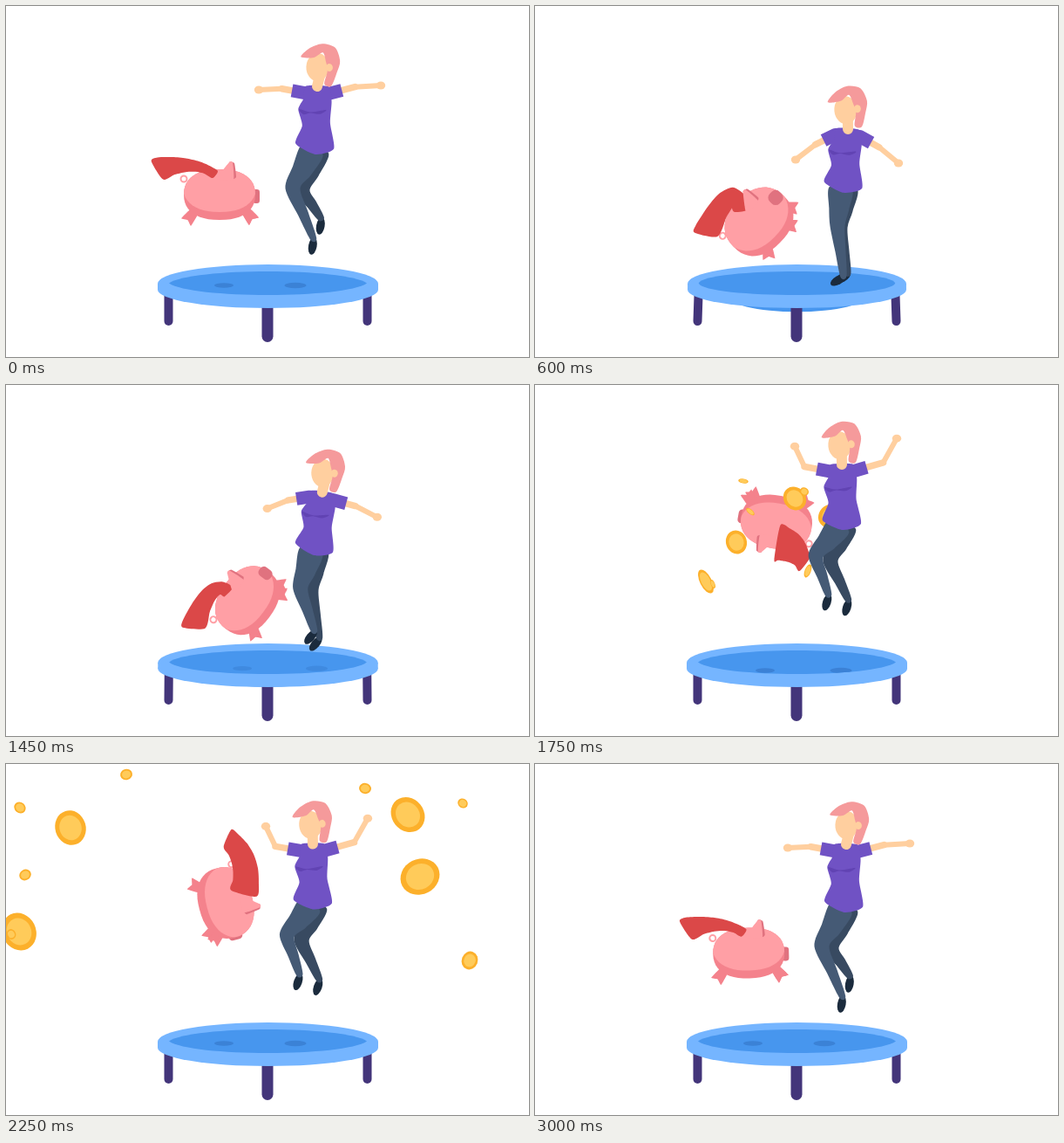
These frames come from a looping animation (600 by 402 pixels, 3.05 s). An HTML page with a canvas:

```html
<!DOCTYPE html>
<html lang="en">
<head>
<meta charset="utf-8">
<title>Trampoline</title>
<style>
html, body { margin: 0; width: 100%; height: 100%; overflow: hidden; background: #fff; }
canvas { display: block; width: 600px; height: 402px; }
</style>
</head>
<body>
<canvas id="stage" width="600" height="402"></canvas>
<script>
const LOOP = 3050, STEP = 50, RAD = Math.PI / 180;
const ctx = document.getElementById('stage').getContext('2d');

const C = {
  rim: '#75b5ff', mat: '#4796ee', shade: '#3b82d6', post: '#43357a',
  pig: '#ff9fa5', belly: '#f4828c', snout: '#e0727f', cape: '#db4848',
  hair: '#f59a9b', skin: '#ffcf9f', shirt: '#7052c4', fold: '#6143b3',
  leg: '#455a75', legBack: '#384a61', shoe: '#1b2b3d',
  gold: '#fcb02b', goldIn: '#ffcb5a'
};

const clamp = (v, a = 0, b = 1) => Math.min(b, Math.max(a, v));
const mix = (a, b, p) => a + (b - a) * p;
const mixAll = (a, b, p) => a.map((v, i) => mix(v, b[i], p));
const ease = {
  io: p => p * p * (3 - 2 * p),
  in: p => p * p,
  out: p => 1 - (1 - p) * (1 - p),
  lin: p => p
};

// keys: [time, easing towards the next key, ...values]
function at(keys, t) {
  let i = 0;
  while (i < keys.length - 2 && t >= keys[i + 1][0]) i++;
  const [t0, e, ...a] = keys[i], [t1, , ...b] = keys[i + 1];
  return mixAll(a, b, ease[e](clamp((t - t0) / (t1 - t0))));
}

function fill(color) { ctx.fillStyle = color; ctx.fill(); }

function oval(x, y, rx, ry, rot, color) {
  ctx.beginPath();
  ctx.ellipse(x, y, rx, ry, rot, 0, 7);
  fill(color);
}

// closed smooth outline through flat x,y pairs
function blob(v, color, k = 1 / 6) {
  const n = v.length / 2;
  const px = i => v[((i + n) % n) * 2], py = i => v[((i + n) % n) * 2 + 1];
  ctx.beginPath();
  ctx.moveTo(px(0), py(0));
  for (let i = 0; i < n; i++) {
    ctx.bezierCurveTo(
      px(i) + (px(i + 1) - px(i - 1)) * k, py(i) + (py(i + 1) - py(i - 1)) * k,
      px(i + 1) - (px(i + 2) - px(i)) * k, py(i + 1) - (py(i + 2) - py(i)) * k,
      px(i + 1), py(i + 1));
  }
  fill(color);
}

function line(points, width, color, cap = 'round') {
  ctx.beginPath();
  for (const [x, y] of points) ctx.lineTo(x, y);
  ctx.lineWidth = width;
  ctx.lineCap = cap;
  ctx.lineJoin = 'round';
  ctx.strokeStyle = color;
  ctx.stroke();
}

// points beside p, at right angles to the direction (dx, dy)
function sides([x, y], [dx, dy], w) {
  const d = Math.hypot(dx, dy) || 1, nx = -dy / d * w, ny = dx / d * w;
  return [[x + nx, y + ny], [x - nx, y - ny]];
}
const ribbon = (rows, tip = []) =>
  [...rows.map(r => r[0]), ...tip, ...rows.map(r => r[1]).reverse()].flat();

// ---- woman
const arch = {
  neck: [357, 92], hem: [355, 168], tilt: [5], toe: [100],
  handL: [290, 96], handR: [430, 91],
  kneeF: [329, 209], footF: [353, 267], kneeB: [340, 211], footB: [362, 244]
};
const stand = {
  neck: [359, 141], hem: [354, 212], tilt: [-3], toe: [150],
  handL: [299, 176], handR: [417, 180],
  kneeF: [347, 252], footF: [354, 310], kneeB: [350, 254], footB: [359, 307]
};
const kick = {
  neck: [369, 93], hem: [353, 163], tilt: [18], toe: [98],
  handL: [301, 86], handR: [440, 105],
  kneeF: [323, 203], footF: [354, 238], kneeB: [350, 205], footB: [361, 263]
};
const tuck = {
  neck: [352, 91], hem: [353, 164], tilt: [-3], toe: [108],
  handL: [298, 70], handR: [415, 61],
  kneeF: [322, 196], footF: [337, 241], kneeB: [339, 202], footB: [360, 247]
};
const bent = {
  neck: [349, 144], hem: [353, 214], tilt: [-17], toe: [150],
  handL: [296, 186], handR: [411, 174],
  kneeF: [346, 254], footF: [353, 316], kneeB: [351, 256], footB: [360, 309]
};
const flights = [arch, kick, tuck, arch];
const landings = [[550, stand], [1560, stand], [2550, bent]];

// falls into the landing pose, then springs out into the next flight
function womanPose(t) {
  const i = t < 1050 ? 0 : t < 2050 ? 1 : 2;
  const [hit, land] = landings[i], d = t - hit;
  const air = flights[d < 0 ? i : i + 1];
  const w = d < 0 ? ease.in(clamp((330 + d) / 280)) : 1 - ease.out(clamp((d - 50) / 145));
  const dip = 6 * Math.max(0, 1 - Math.abs(d) / 50);
  const pose = {};
  for (const k in air) {
    pose[k] = mixAll(air[k], land[k], w);
    if (pose[k].length > 1) pose[k][1] += dip;
  }
  return pose;
}

function leg(hip, knee, foot, toe, color) {
  const a = toe * RAD, to = (p, q) => [q[0] - p[0], q[1] - p[1]];
  oval(foot[0] + Math.cos(a) * 7, foot[1] + Math.sin(a) * 8, 10, 4.8, a, C.shoe);
  blob(ribbon([
    sides(hip, to(hip, knee), 13),
    sides(mixAll(hip, knee, .55), to(hip, knee), 11.5),
    sides(knee, to(hip, foot), 8.5),
    sides(mixAll(knee, foot, .5), to(knee, foot), 6),
    sides(foot, to(knee, foot), 3.5)
  ]), color, 1 / 7);
}

function arm(body, hand, out) {
  const shoulder = body(14 * out, 8);
  const lift = clamp((shoulder[1] - hand[1] - 12) / 16);
  const mid = mixAll(shoulder, hand, .5);
  const elbow = [mid[0] + out * 9 * lift, mid[1] + 12 * lift - 3];
  const cuff = mixAll(shoulder, elbow, 15 / Math.hypot(elbow[0] - shoulder[0], elbow[1] - shoulder[1]));
  line([shoulder, elbow], 7.5, C.skin);
  line([elbow, hand], 6, C.skin);
  oval(...hand, 5.2, 4.5, 0, C.skin);
  line([body(4 * out, 8), shoulder, cuff], 15, C.shirt, 'butt');
}

function head(x, y, turn) {
  ctx.save();
  ctx.translate(x, y);
  ctx.rotate(turn);
  oval(-1.5, 0, 13, 16, 0, C.skin);
  blob([-21, -11, -12, -21, 3, -27, 18, -23, 24, -8, 21, 5, 15, 21, 7, 19,
    10, 4, 8, -6, 4, -17, -6, -11], C.hair, 1 / 7);
  oval(12, 0, 4, 4.5, 0, C.skin);
  ctx.restore();
}

function woman(t) {
  const p = womanPose(t), [nx, ny] = p.neck, [hx, hy] = p.hem;
  const size = Math.hypot(hx - nx, hy - ny), ax = (hx - nx) / size, ay = (hy - ny) / size;
  // across and down the torso
  const body = (u, v) => [nx + u * ay + v * ax * size / 77, ny - u * ax + v * ay * size / 77];

  leg([hx + 3, hy - 4], p.kneeB, p.footB, p.toe[0], C.legBack);
  leg([hx - 3, hy - 4], p.kneeF, p.footF, p.toe[0], C.leg);
  arm(body, p.handL, -1);
  arm(body, p.handR, 1);
  const trunk = [[-13, 0], [13, 0], [17, 17], [16, 42], [21, 72], [0, 79],
    [-23, 67], [-16, 46], [-21, 27], [-15, 14]];
  blob(trunk.flatMap(q => body(...q)), C.shirt, 1 / 9);
  const fold = [[-20, 27], [-7, 30], [11, 27], [4, 32], [-7, 31], [-15, 33]];
  blob(fold.flatMap(q => body(...q)), C.fold);

  const lean = p.tilt[0] * RAD;
  const top = [nx + 22 * Math.sin(lean), ny - 22 * Math.cos(lean)];
  line([[top[0] + 1, top[1] + 10], [nx, ny]], 12, C.skin);
  head(...top, lean - 3 * RAD);
}

// ---- pig: how far it faces us | cape bend x y, end x y, half width at root and end
const glide = [0, -28, -40, -68, -30, 5, 13];
const roll = [1, 20, -58, -50, -35, 9, 14];
const flip = [.3, -25, -23, -37, -40, 20, 9];
const dive = [.4, -38, -41, -68, -24, 15, 11];

const pigKeys = [
  [0, 'io', 245, 216, 0, ...glide], [210, 'in', 249, 226, -8, ...glide],
  [510, 'lin', 262, 282, -52, ...roll], [600, 'out', 257, 247, -45, ...roll],
  [820, 'io', 264, 206, -12, ...glide], [1050, 'io', 275, 200, 6, ...glide],
  [1240, 'in', 278, 210, -18, ...glide], [1530, 'out', 276, 280, -85, ...roll],
  [1750, 'lin', 277, 157, -170, ...flip], [2250, 'in', 252, 159, -285, ...dive],
  [2520, 'lin', 254, 290, -392, ...roll], [2600, 'out', 251, 260, -405, ...roll],
  [2820, 'io', 247, 220, -372, ...glide], [3050, 'io', 245, 216, -360, ...glide]
];

function bodyPath(rx, ry) {
  ctx.beginPath();
  for (let i = 0; i < 48; i++) {
    const a = i * Math.PI / 24, c = Math.cos(a), s = Math.sin(a), n = .86;
    ctx.lineTo(rx * Math.sign(c) * Math.abs(c) ** n, ry * Math.sign(s) * Math.abs(s) ** n);
  }
  ctx.closePath();
}

function foot(x, y) {
  ctx.save();
  ctx.translate(x, y);
  ctx.rotate((x < 0 ? 38 : -38) * RAD);
  blob([-5, -8, 5, -8, 7, 7, 0, 4, -7, 7], C.belly, 1 / 20);
  ctx.restore();
}

function snout(face) {
  const rx = 4 + 4 * face, x = 42 - 9 * face, y = 2 - 8 * face;
  ctx.beginPath();
  ctx.roundRect(x - rx, y - 8, rx * 2, 16, rx * .8);
  fill(C.snout);
}

function cape([bx, by, ex, ey, w0, w1]) {
  const root = [-5, -23], bend = [bx, by], end = [ex, ey], rows = [];
  for (let s = 0; s <= 1; s += .2) {
    const a = mixAll(root, bend, s), b = mixAll(bend, end, s);
    rows.push(sides(mixAll(a, b, s), [b[0] - a[0], b[1] - a[1]], mix(w0, w1, s * s)));
  }
  const [near] = rows.at(-1), d = Math.hypot(ex - bx, ey - by);
  const tip = [near[0] * .8 + ex * .2 + (ex - bx) / d * 8, near[1] * .8 + ey * .2 + (ey - by) / d * 8];
  blob(ribbon(rows, [tip]), C.cape, 1 / 8);
}

function pig(t) {
  const [x, y, turn, face, ...cloth] = at(pigKeys, t);
  const rx = 41, ry = 29 + 5 * face;
  ctx.save();
  ctx.translate(x, y);
  ctx.rotate(turn * RAD);
  ctx.beginPath();
  ctx.arc(-rx, -18, 3.5, 0, 7);
  ctx.lineWidth = 2;
  ctx.strokeStyle = C.pig;
  ctx.stroke();
  foot(16 * face - 34, 26 + 7 * face);
  foot(35 - 12 * face, 25 + 4 * face);
  foot(35 + 3 * face, 25 - 10 * face);
  if (face < .5) snout(face);
  bodyPath(rx, ry);
  fill(C.belly);
  ctx.save();
  ctx.clip();
  ctx.translate(0, -10);
  bodyPath(rx + 1, ry + 1);
  fill(C.pig);
  ctx.restore();
  if (face >= .5) snout(face);
  cape(cloth);
  blob([11, -37, 17, -36, 19, -20, 14, -18], C.snout, 1 / 14);
  blob([-3, -18, 11, -37, 15, -37, 16, -17], C.pig, 1 / 14);
  ctx.restore();
}

// ---- coins: x y at the burst, x y half a second later, radius
const BURST = 1750, FLY = 500;
const coins = [
  [231, 180, 22, 127, 7], [196, 225, 15, 192, 22],
  [296, 128, 138, 12, 7], [204, 228, 6, 195, 6],
  [231, 180, 74, 73, 20], [313, 213, 532, 225, 10.5],
  [298, 130, 461, 58, 21], [239, 110, 412, 28, 7],
  [340, 150, 475, 129, 23], [247, 145, 16, 50, 7],
  [309, 122, 524, 45, 6]
];

function coin([x0, y0, x1, y1, size], i, t) {
  const p = (t - BURST) / FLY, late = Math.max(0, p - 1) / .7;
  const rise = 1 - Math.sign(1 - p) * Math.abs(1 - p) ** 1.6;
  const x = mix(x0, x1, p + late * .05);
  const y = late ? y1 + (y1 - y0) * .25 * late + 62 * late * late : mix(y0, y1, rise);
  const r = mix(mix(4, size, .6), size, Math.min(p, 1.4));
  const spin = 1 + .6 * (i % 2);
  const w = Math.max(.22, Math.abs(Math.cos(.5 + spin * (p - 1))));
  const tilt = (y1 - 85) / 40, inner = mix(.85, .7, w);
  oval(x, y, r * w, r, tilt, C.gold);
  oval(x, y, r * w * inner, r * inner, tilt, C.goldIn);
}

function burst(t) {
  if (t < BURST - 50 || t > 2900) return;
  ctx.globalAlpha = clamp((2900 - t) / 350);
  coins.forEach((c, i) => coin(c, i, t));
  ctx.globalAlpha = 1;
}

// ---- trampoline
const shadeKeys = [
  [0, 'io', 250, 332, 320], [1050, 'io', 282, 365, 321],
  [1750, 'out', 264, 351, 327], [2250, 'io', 250, 332, 320], [LOOP, 'io', 250, 332, 320]
];

function trampoline(t) {
  const sag = Math.max(...landings.map(([hit]) => Math.exp(-(((t - hit) / 85) ** 2))));
  const cx = 300.5, rx = 126.5 - 1.5 * sag;
  const post = (x, y0, y1, w, tilt) => line([[x + tilt, y0], [x, y1 - w / 2]], w, C.post);
  oval(cx, 330, 82, 14 + 9 * sag, 0, C.mat);
  post(186.5, 330, 366, 10, 1.5 * sag);
  post(414.5, 330, 366, 10, -1.5 * sag);
  post(300, 342, 385, 13, 0);
  oval(cx, 318, rx, 22, 0, C.rim);
  oval(cx, 325, rx, 21, 0, C.rim);
  ctx.fillRect(cx - rx, 318, rx * 2, 7);

  const l = 187 + sag, r = 414 - sag, inset = 26 * (1 - sag);
  ctx.save();
  ctx.beginPath();
  ctx.moveTo(l, 317.5);
  ctx.bezierCurveTo(l + inset, 299.5, r - inset, 299.5, r, 317.5);
  ctx.bezierCurveTo(r - inset, 335.5, l + inset, 335.5, l, 317.5);
  fill(C.mat);
  ctx.clip();
  const [a, b, y] = at(shadeKeys, t);
  ctx.globalAlpha = clamp(1 - 2.2 * sag);
  oval(a, y, 11, 2.7, 0, C.shade);
  oval(b, y, 12.5, 3.2, 0, C.shade);
  ctx.restore();
}

function draw(t) {
  ctx.fillStyle = '#fff';
  ctx.fillRect(0, 0, 600, 402);
  trampoline(t);
  pig(t);
  burst(t);
  woman(t);
}

const start = performance.now();
function tick() {
  const t = Math.max(0, performance.now() - start) % LOOP;
  draw(Math.floor(t / STEP) * STEP);
  requestAnimationFrame(tick);
}
tick();
</script>
</body>
</html>
```
